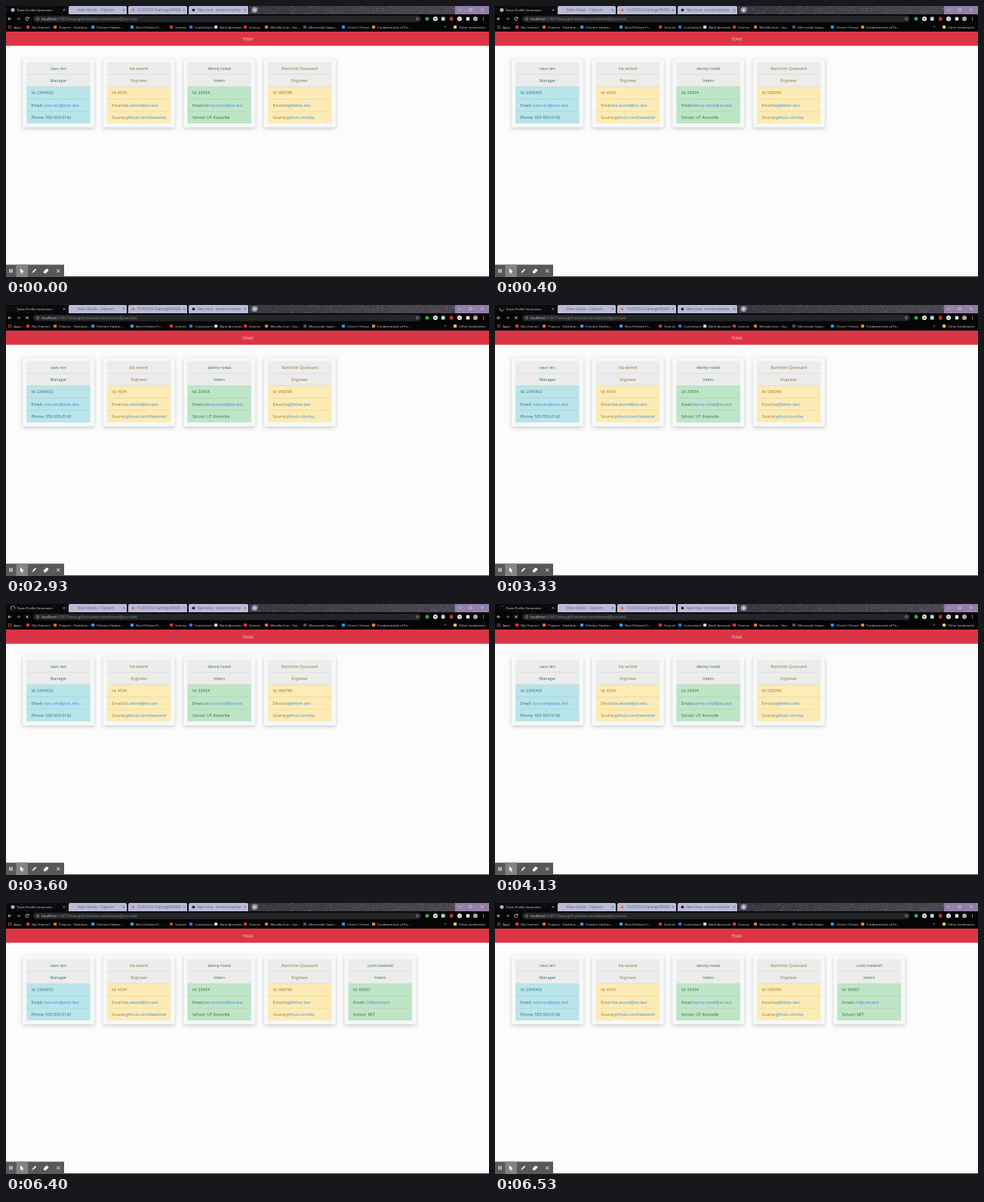
Recreate the animation shown at these times as an HTML page with a canvas. Size 640x360 px, loop 8 s.

```html
<!DOCTYPE html>
<html lang="en">
<head>
<meta charset="utf-8">
<title>Team Profile Generator</title>
<style>
html, body { margin: 0; width: 100%; height: 100%; overflow: hidden; background: #fcfcfc; }
canvas { display: block; width: 640px; height: 360px; }
</style>
</head>
<body>
<canvas id="stage"></canvas>
<script>
const LOOP = 8000, LOAD_START = 2930, CARD_AT = 4400, LOAD_END = 4600, SPIN = 1333;
const UI = '"Open Sans", "Noto Sans", sans-serif';

const canvas = document.getElementById('stage');
const dpr = window.devicePixelRatio || 1;
canvas.width = 640 * dpr;
canvas.height = 360 * dpr;
const c = canvas.getContext('2d');
c.scale(dpr, dpr);

const themes = {
  info: { bg: '#b9e4e9', ink: '#2a6d78' },
  warning: { bg: '#fdebb5', ink: '#94762a' },
  success: { bg: '#bde5c6', ink: '#33693f' }
};

const team = [
  { name: 'tavo ren', role: 'Manager', theme: 'info', id: '2345432',
    mail: ' tavo.ren@post.test', extra: ['Phone: 555-555-0142'] },
  { name: 'lila wistrel', role: 'Engineer', theme: 'warning', id: '4534',
    mail: 'lila.wistrel@ox.test', extra: ['Source:', 'github.com/lilawistrel'] },
  { name: 'denny rostal', role: 'Intern', theme: 'success', id: '23434',
    mail: 'denny.rostal@ox.test', extra: ['School: UT Knoxville'] },
  { name: 'Bartholin Quessard', role: 'Engineer', theme: 'warning', id: '098789',
    mail: 'bq@letter.test', extra: ['Source:', 'github.com/bq'] },
  { name: 'corin hasbrell', role: 'Intern', theme: 'success', id: '65457',
    mail: 'c.h@post.test', extra: ['School: MIT'] }
];

const bookmarks = [
  [5, '#e05a4a', 'Apps'], [29, '#e33', 'My Channel'], [65, '#e8672c', 'Projects · Dashboo...'],
  [115, '#4a90d9', 'Filmlore Harbor...'], [167, '#3f9be0', 'Best Filmlore Fi...'],
  [219, '#d33', 'Science'], [245, '#3a6fe0', 'CueLantern'], [278, '#c9d6e6', 'Bank Accounts'],
  [317, '#d33', 'Science'], [345, '#e2703c', 'Wendlo.Com - Sta...'],
  [396, '#456', 'Microscale Gazet...'], [447, '#1d9bf0', 'Chirrel / Home'],
  [487, '#e08a2c', 'Fundamentals of Pe...'], [595, '#e8c65a', 'Other bookmarks']
];

const tabs = [
  [83, 78, '#f2a3b4', 'Video Details - Cliploom'],
  [162, 79, '#f0702c', '10-OOD10-Challenge/README'],
  [242, 80, '#22242c', 'New Issue · norvelcrane/esp']
];

function rect(x, y, w, h, color) {
  c.fillStyle = color;
  c.fillRect(x, y, w, h);
}

function round(x, y, w, h, r, color) {
  c.fillStyle = color;
  c.beginPath();
  c.roundRect(x, y, w, h, r);
  c.fill();
}

function dot(x, y, r, color) {
  c.fillStyle = color;
  c.beginPath();
  c.arc(x, y, r, 0, 7);
  c.fill();
}

function line(color, width, ...pts) {
  c.strokeStyle = color;
  c.lineWidth = width;
  c.beginPath();
  for (let i = 0; i < pts.length; i += 2) c.lineTo(pts[i], pts[i + 1]);
  c.stroke();
}

function shape(color, ...pts) {
  c.fillStyle = color;
  c.beginPath();
  for (let i = 0; i < pts.length; i += 2) c.lineTo(pts[i], pts[i + 1]);
  c.fill();
}

function arc(x, y, r, from, to, color, width) {
  c.strokeStyle = color;
  c.lineWidth = width;
  c.beginPath();
  c.arc(x, y, r, from, to);
  c.stroke();
}

function cross(x, y, r, color, width = 0.8) {
  line(color, width, x - r, y - r, x + r, y + r);
  line(color, width, x + r, y - r, x - r, y + r);
}

// Draws text centred on y and returns its width.
function text(s, x, y, size, color, align = 'left') {
  c.font = `${size}px ${UI}`;
  c.textAlign = align;
  c.textBaseline = 'alphabetic';
  c.fillStyle = color;
  c.fillText(s, x, y + size * 0.36);
  return c.measureText(s).width;
}

function seeded(seed) {
  return () => (seed = (seed * 16807) % 2147483647) / 2147483647;
}

function drawSky() {
  rect(0, 0, 640, 12, '#09090b');
  const g = c.createLinearGradient(322, 0, 595, 0);
  g.addColorStop(0, '#37373d');
  g.addColorStop(0.6, '#424148');
  g.addColorStop(1, '#4a4551');
  c.fillStyle = g;
  c.fillRect(322, 0, 273, 11);
  rect(595, 0, 45, 11, '#927da6');

  const rnd = seeded(71);
  for (let i = 0; i < 1100; i++) {
    const x = rnd() * 640, y = rnd() * 10.5, glow = rnd();
    const strength = x < 322 ? 0.25 : 0.45;
    rect(x, y, 0.9, 0.9, `rgba(222,218,232,${strength * glow * glow})`);
  }
  line('#ddd', 0.6, 599, 5, 603, 5);
  c.strokeRect(614, 3.5, 3.2, 3.2);
  cross(631, 5, 1.7, '#ddd', 0.6);
}

function drawSpinner(t) {
  const p = ((t - LOAD_START) / SPIN) % 1;
  const sweep = Math.PI * 1.5 * Math.sin(Math.PI * p) ** 2;
  const start = -Math.PI / 2 + p * Math.PI * 2.2;
  arc(9, 5.3, 2.6, start, start + sweep, '#d5d8dc', 0.8);
}

function drawTabs(t, loading) {
  for (const [x, w, icon, title] of tabs) {
    round(x, 0, w - 1, 11, [2, 2, 0, 0], '#b9bad8');
    dot(x + 6.5, 5.3, 1.9, icon);
    text(title, x + 11.5, 5.3, 4.4, '#5d5d7d');
    rect(x + w - 9, 1, 8, 9.5, '#b9bad8');
    cross(x + w - 5, 5.3, 1.1, '#444', 0.6);
  }
  if (loading) drawSpinner(t);
  else {
    dot(9, 5.3, 2.4, '#e8eaed');
    line('#444', 0.5, 6.8, 5.3, 11.2, 5.3);
    line('#444', 0.5, 9, 3, 9, 7.6);
  }
  text('Team Profile Generator', 14.5, 5.4, 4.35, '#e2e2e4');
  cross(77, 5.3, 1.1, '#ddd', 0.6);
  dot(329.5, 5.3, 4, '#8f91a8');
  line('#fff', 0.7, 327.5, 5.3, 331.5, 5.3);
  line('#fff', 0.7, 329.5, 3.3, 329.5, 7.3);
}

function drawToolbar(loading) {
  rect(0, 11, 640, 23, '#050506');
  for (const [x, dir] of [[5, 1], [16.5, -1]]) {
    const ink = dir > 0 ? '#eee' : '#888';
    line(ink, 0.8, x - 2.2, 17, x + 2.2, 17);
    line(ink, 0.8, x - 0.2 * dir, 15, x - 2.2 * dir, 17, x - 0.2 * dir, 19);
  }
  if (loading) cross(28, 17, 1.8, '#eee');
  else {
    arc(28, 17, 2.1, 0.5, 5.5, '#eee', 0.8);
    line('#eee', 0.8, 30.2, 14.6, 30.2, 16.3, 28.5, 16.3);
  }
  round(36, 12.8, 514, 8.6, 4.3, '#242529');
  arc(42, 17.1, 1.8, 0, 7, '#aaa', 0.6);
  line('#aaa', 0.6, 42, 16.6, 42, 18);
  const w = text('localhost', 47, 17.1, 4.75, '#cfcfd2');
  text(':61807/www.github/www.norvelcrane@post.test', 47 + w, 17.1, 4.75, '#85868b');
  arc(545, 17, 1.5, 0, 7, '#bbb', 0.6);

  dot(558, 17, 2.5, '#27b04a');
  dot(569, 17, 3, '#eee');
  dot(569, 17, 1.3, '#777');
  round(576.8, 14.6, 4.8, 4.8, 0.8, '#a5dcd8');
  round(588, 14.6, 4.4, 4.8, 0.8, '#c9322c');
  dot(601, 17, 3, '#eee');
  dot(601, 17, 1.3, '#999');
  round(609.8, 14.8, 4.4, 4.4, 0.6, '#eee');
  dot(622, 17, 3, '#b9a79c');
  for (let i = -1; i < 2; i++) dot(632.5, 17 + i * 1.8, 0.55, '#eee');
}

function drawBookmarks() {
  for (const [x, color, label] of bookmarks) {
    if (label === 'Apps') {
      for (let i = 0; i < 9; i++) rect(x - 2 + (i % 3) * 1.6, 26 + (i / 3 | 0) * 1.6, 1, 1, color);
    } else round(x - 2, 25.9, 4.2, 4.2, 0.8, color);
    text(label, x + 5.2, 28.1, 4.3, '#d6d6d8');
  }
  text('»', 581, 27.8, 4.5, '#ddd');
}

function drawRow(label, link, x, y, ink) {
  const w = text(label, x, y, 5.33, ink);
  if (link) text(link, x + w, y, 5.33, '#358de0');
}

function drawCard(m, i) {
  const x = 22 + i * 106.6, { bg, ink } = themes[m.theme];
  c.save();
  c.shadowColor = 'rgba(0,0,0,.2)';
  c.shadowBlur = 5.5 * dpr;
  c.shadowOffsetY = 1.8 * dpr;
  round(x, 69.7, 95.2, 91.6, 1.3, '#f5f9f8');
  c.restore();

  rect(x + 5.2, 74.5, 84.5, 32.7, '#ececec');
  rect(x + 5.2, 107.2, 84.5, 48.8, bg);
  for (const y of [90.8, 107.1, 123.6, 139.9]) {
    line('rgba(0,0,0,.14)', 0.5, x + 5.2, y, x + 89.7, y);
  }
  text(m.name, x + 47.5, 82.8, 5.33, ink, 'center');
  text(m.role, x + 47.5, 99.2, 5.33, ink, 'center');
  drawRow('Id: ' + m.id, '', x + 11.7, 115.5, ink);
  drawRow('Email:', m.mail, x + 11.7, 131.8, ink);
  drawRow(m.extra[0], m.extra[1], x + 11.7, 148.2, ink);
}

function drawRecorder() {
  rect(77, 359, 563, 1, '#444');
  rect(0, 343.6, 77, 16.4, '#585859');
  rect(13.5, 343.6, 15.5, 16.4, '#838384');
  rect(4.6, 349.4, 1.3, 5, '#fff');
  rect(7.2, 349.4, 1.3, 5, '#fff');
  shape('#fff', 19, 348.5, 19, 355, 20.6, 353.6, 21.7, 356, 22.7, 355.5, 21.6, 353.2, 23.8, 353);
  line('#fff', 1.7, 35.6, 353.7, 39.6, 349.7);
  line('#fff', 0.8, 34.4, 354.9, 36, 353.3);
  shape('#fff', 50, 352.3, 54, 348.8, 56.4, 350.5, 56, 352, 52, 355.4, 50, 354.2);
  cross(69.3, 352, 2.1, '#fff', 0.9);
}

function draw(t) {
  const loading = t >= LOAD_START && t < LOAD_END;
  rect(0, 0, 640, 360, '#fcfcfc');
  drawSky();
  drawToolbar(loading);
  drawTabs(t, loading);
  drawBookmarks();
  rect(0, 34, 640, 18.8, '#db3545');
  text('TEAM', 320, 44, 5.33, '#f8d5d8', 'center');
  team.slice(0, t < CARD_AT ? 4 : 5).forEach(drawCard);
  drawRecorder();
}

const begin = performance.now();
function tick() {
  draw((performance.now() - begin) % LOOP);
  requestAnimationFrame(tick);
}
tick();
</script>
</body>
</html>
```
